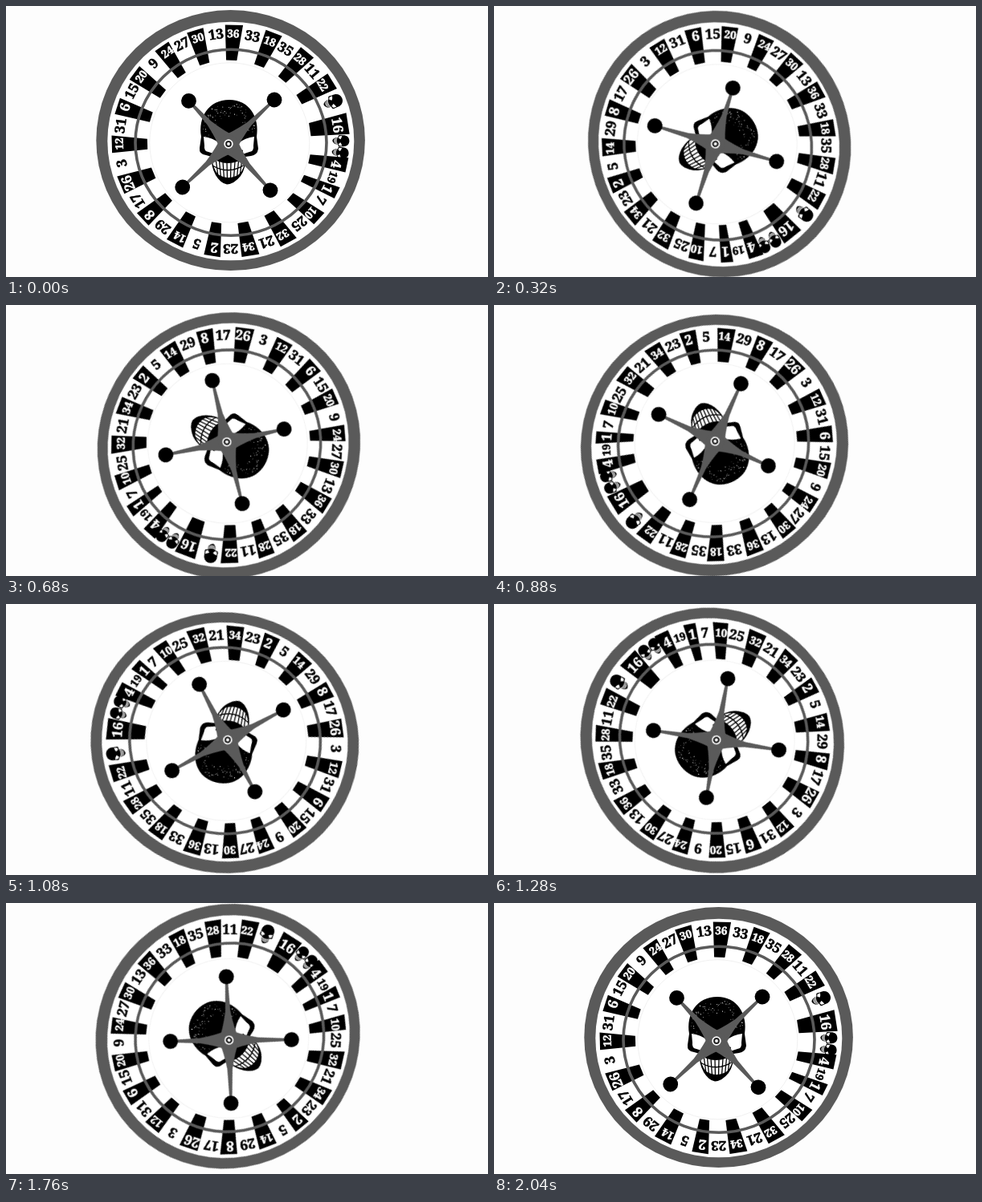
Recreate the animation shown at these times as an HTML page. Size 600 by 338 pixels, loop 2.08 s.

```html
<!DOCTYPE html>
<html lang="en">
<head>
<meta charset="utf-8">
<title>Roulette wheel</title>
<style>
  html, body { margin: 0; width: 100%; height: 100%; overflow: hidden; background: #fdfdfd; }
  svg { display: block; width: 600px; height: 338px; }
  #wheel {
    transform-origin: 276.3px 170.8px;
    animation: spin 2080ms -2ms infinite;
  }
  /* stepped turn that rests for one extra step at 90 and 270 degrees */
  @keyframes spin {
    0%        { transform: rotate(0deg);   animation-timing-function: steps(12); }
    23.0769%  { transform: rotate(90deg);  animation-timing-function: steps(1); }
    25%       { transform: rotate(90deg);  animation-timing-function: steps(24); }
    71.1538%  { transform: rotate(270deg); animation-timing-function: steps(1); }
    73.0769%  { transform: rotate(270deg); animation-timing-function: steps(13); }
    98.0769%, 100% { transform: rotate(360deg); }
  }
  text {
    font-family: "Noto Serif", "Liberation Serif", serif;
    font-weight: 900;
    text-anchor: middle;
    stroke-width: .5;
  }
  .grey { fill: #5a5a5a; }
  .white { fill: #fff; }
</style>
</head>
<body>
<svg viewBox="0 0 600 338">
  <defs>
    <g id="skull">
      <path d="M243 163C239 139 252 117 278 117C303 117 316 139 312 163L314 178Q313 186 305 187L298 188Q299 202 292 212Q284 222 275 222.500Q267 221 261 211Q255 200 256 188L249 186Q240 185 241 177Z"/>
      <path class="white" d="M246 163Q257 164 267 172Q266 178 260 180L261 185L252 182Q246 181 247 174ZM309 163Q298 164 288 172Q289 178 295 180L294 185L303 182Q309 181 308 174Z"/>
      <path class="white" d="M257 190Q266 196 277 196Q288 196 297 189Q298 202 290 210Q277 218 264 210Q257 202 257 190Z"/>
      <path d="M261 190L264 212M265.500 193L267.500 214M270 194L271.500 215M275 195L275.500 216M280 195L279.500 216M285 194L283.500 215M289.500 193L287.500 214M294 190L291 212M257 199Q277 211 297 198"
            fill="none" stroke="#000" stroke-width="1.300"/>
    </g>
  </defs>
  <g id="wheel">
    <ellipse class="grey" cx="279.600" cy="167.600" rx="167.300" ry="162.500"/>
    <ellipse class="white" cx="279.800" cy="168.500" rx="153.500" ry="148.800"/>
    <g id="slots"></g>
    <ellipse cx="280" cy="170.300" rx="119" ry="116" fill="none" stroke="#5a5a5a" stroke-width="3.600"/>
    <circle cx="278.300" cy="170.300" r="99.500" fill="none" stroke="#ededed" stroke-width=".8"/>
    <use href="#skull"/>
    <g id="specks" class="white"></g>
    <g id="cross"></g>
    <circle class="grey" cx="277" cy="172" r="11"/>
    <circle cx="277" cy="172" r="4.800" fill="#222" stroke="#fff" stroke-width="1.800"/>
    <circle class="white" cx="277" cy="172" r="1.900"/>
  </g>
</svg>
<script>
const rad = Math.PI / 180;
const $ = id => document.getElementById(id);

// clockwise from the top; S is one skull, D a pair
const labels = "36 33 18 35 28 11 22 S 16 D 4 19 1 7 10 25 32 21 34 23 2 5 14 29 8 17 26 3 12 31 6 15 20 9 24 27 30 13".split(" ");
const angles = [
  1.4, 11.8, 21.5, 30.8, 40.3, 49.3, 58.6, 69, 81.5, 93, 102.4, 109.6, 116.5, 123.2,
  131.9, 140.4, 151, 160.5, 170.4, 180, 188.8, 198.2, 207.9, 218.3, 227.6, 237.3, 247.6,
  258.5, 268.6, 278, 287.8, 296.8, 305.9, 315.3, 324.7, 333.5, 342.4, 352.2
];

const point = (cx, cy, rx, ry, a) =>
  [cx + rx * Math.sin(a * rad), cy - ry * Math.cos(a * rad)].map(v => v.toFixed(2)).join(" ");
const outer = a => point(279.6, 168.5, 148.3, 145.2, a);
const inner = a => point(277.8, 169.5, 102, 102, a);

function labelAt(a, extra = 0) {
  const s = Math.sin(a * rad);
  const r = 134.2 - 2 * s + 2.5 * s * s + extra;
  return `translate(${point(279.6, 168.5, r, r, a)}) rotate(${a})`;
}

const smallSkull = (a, size, extra) =>
  `<use href="#skull" transform="${labelAt(a, extra)} scale(${size}) translate(-277.5 -170)"/>`;

function box(a, before, after) {
  const lo = k => a - (a - before) * k / 2;
  const hi = k => a + (after - a) * k / 2;
  return `<path d="M${outer(lo(.88))}L${outer(hi(.88))}L${inner(hi(.76))}L${inner(lo(.76))}Z"/>`;
}

function slot(label, i) {
  const n = labels.length, a = angles[i];
  if (label === "S") return smallSkull(a, .23, 2);
  if (label === "D") return smallSkull(a - 3.1, .2, 2.5) + smallSkull(a + 3.1, .2, 2.5);
  const before = i ? angles[i - 1] : angles[n - 1] - 360;
  const after = i < n - 1 ? angles[i + 1] : angles[0] + 360;
  const black = i % 2 === 0;
  const small = label === "19" || (black && label.length > 1 && after - before < 21);
  const ink = black ? "#fff" : "#000";
  return (black ? box(a, before, after) : "") +
    `<text transform="${labelAt(a)}" dy=".36em" font-size="${small ? 13.5 : 17}" fill="${ink}" stroke="${ink}">${label}</text>`;
}
$("slots").innerHTML = labels.map(slot).join("");

// white grain on the crown
let seed = 7;
const random = () => (seed = seed * 16807 % 2147483647) / 2147483647;
let specks = "";
for (let i = 0; i < 85; i++) {
  const a = 160 + 220 * random(), r = Math.sqrt(.2 + .72 * random());
  const x = 278 + 34 * r * Math.cos(a * rad), y = 152 + 33 * r * Math.sin(a * rad);
  specks += `<circle cx="${x.toFixed(1)}" cy="${y.toFixed(1)}" r="${(.25 + .35 * random()).toFixed(2)}"/>`;
}
$("specks").innerHTML = specks;

// four tapered arms with a ball at each end
const balls = [[227.5, 118.3], [334, 117], [219.7, 226], [329, 229.8]];
$("cross").innerHTML = balls.map(([x, y]) => {
  const dx = x - 277, dy = y - 172, len = Math.hypot(dx, dy);
  const turn = Math.atan2(dy, dx) / rad;
  return `<g transform="translate(277 172) rotate(${turn.toFixed(2)})">
    <path class="grey" d="M0 -13Q14 -7 36 -3.200L${len} -1.500V1.500L36 3.200Q14 7 0 13Z"/>
    <circle cx="${len}" r="9.400"/></g>`;
}).join("");
</script>
</body>
</html>
```
